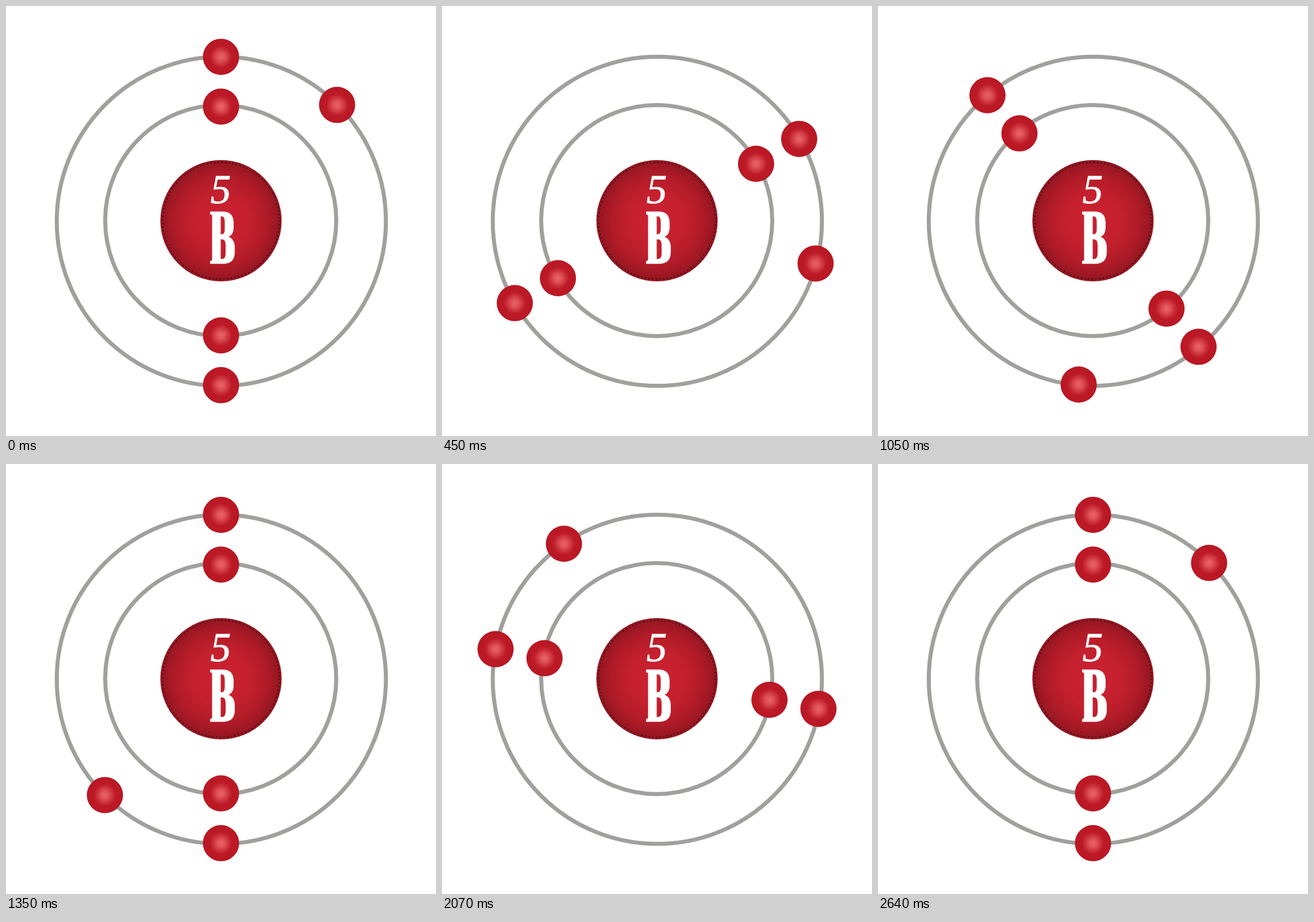
These frames come from a looping animation (748 px wide and 748 px high, 2670 ms). An HTML page with a canvas:

```html
<!DOCTYPE html>
<html lang="en">
<head>
<meta charset="utf-8">
<title>Boron atom</title>
<style>
  html, body { margin: 0; width: 100%; height: 100%; overflow: hidden; background: #fff; }
  canvas { display: block; width: 748px; height: 748px; }
</style>
</head>
<body>
<canvas id="stage" width="748" height="748" role="img" aria-label="5 B"></canvas>
<script>
const ctx = document.getElementById('stage').getContext('2d');
const CENTER = 374, INNER = 199, OUTER = 285.6;
const STEP = 30, STEPS = 89, HALF_STEPS = 45;

function ring(x, y, radius) {
  ctx.beginPath();
  ctx.arc(x, y, radius, 0, Math.PI * 2);
  ctx.lineWidth = 7;
  ctx.strokeStyle = '#a0a09c';
  ctx.stroke();
}

function ball(x, y, radius, stops) {
  const fill = ctx.createRadialGradient(x, y, 0, x, y, radius);
  stops.forEach(([at, color]) => fill.addColorStop(at, color));
  ctx.beginPath();
  ctx.arc(x, y, radius, 0, Math.PI * 2);
  ctx.fillStyle = fill;
  ctx.fill();
}

// Angles run clockwise from the top, in degrees.
function electron(orbit, degrees) {
  const a = degrees * Math.PI / 180;
  ball(CENTER + orbit * Math.sin(a), CENTER - orbit * Math.cos(a), 31.5,
    [[0, '#e86468'], [0.2, '#e05358'], [0.6, '#bd1a27'], [1, '#b91723']]);
}

const letterB = new Path2D(`
  M355 357.5 H376 C390 357.5 396 364 396 378 V384 C396 394 393 399 387 401.5
  C394 404 398 410 398 420 V428 C398 442 391 448.5 377 448.5 H355 V444 L358.5 442 V364 L355 362 Z
  M373.5 366 V397 H375 C379 397 380.5 394 380.5 388 V376 C380.5 369 379 366 375 366 Z
  M373.5 406 V440 H375.5 C380 440 382 437 382 430 V416 C382 409 380 406 375.5 406 Z`);

function nucleus() {
  ball(374, 373.5, 105.5,
    [[0, '#cb2130'], [0.45, '#c5202e'], [0.75, '#b11b28'], [1, '#911621']]);

  // Fine dotted rim.
  const rim = 101.5, pitch = Math.PI * 2 * rim / 100;
  ctx.beginPath();
  ctx.arc(374, 373.5, rim, 0, Math.PI * 2);
  ctx.setLineDash([1.9, pitch - 1.9]);
  ctx.lineWidth = 1.9;
  ctx.strokeStyle = '#25080b';
  ctx.stroke();
  ctx.setLineDash([]);

  ctx.fillStyle = ctx.strokeStyle = '#fff';
  ctx.font = 'italic 71px "Liberation Serif", serif';
  ctx.textAlign = 'center';
  ctx.lineWidth = 1;
  ctx.fillText('5', 373.5, 342.5);
  ctx.strokeText('5', 373.5, 342.5);
  ctx.fill(letterB, 'evenodd');
}

// The second half turn takes two steps less than the first.
function turnAt(step) {
  return step <= HALF_STEPS
    ? 180 * step / HALF_STEPS
    : 180 + 180 * (step - HALF_STEPS) / (STEPS - 1 - HALF_STEPS);
}

function draw(now) {
  const turn = turnAt(Math.floor(now / STEP) % STEPS);
  ctx.fillStyle = '#fff';
  ctx.fillRect(0, 0, 748, 748);
  ring(374.6, 374.5, 286.3);
  ring(373.5, 373.2, 201);
  nucleus();
  for (const offset of [0, 180]) {
    electron(INNER, turn + offset);
    electron(OUTER, turn + offset);
  }
  electron(OUTER, turn + 45);
}

const start = performance.now();
function tick() {
  draw(performance.now() - start);
  requestAnimationFrame(tick);
}
tick();
</script>
</body>
</html>
```
